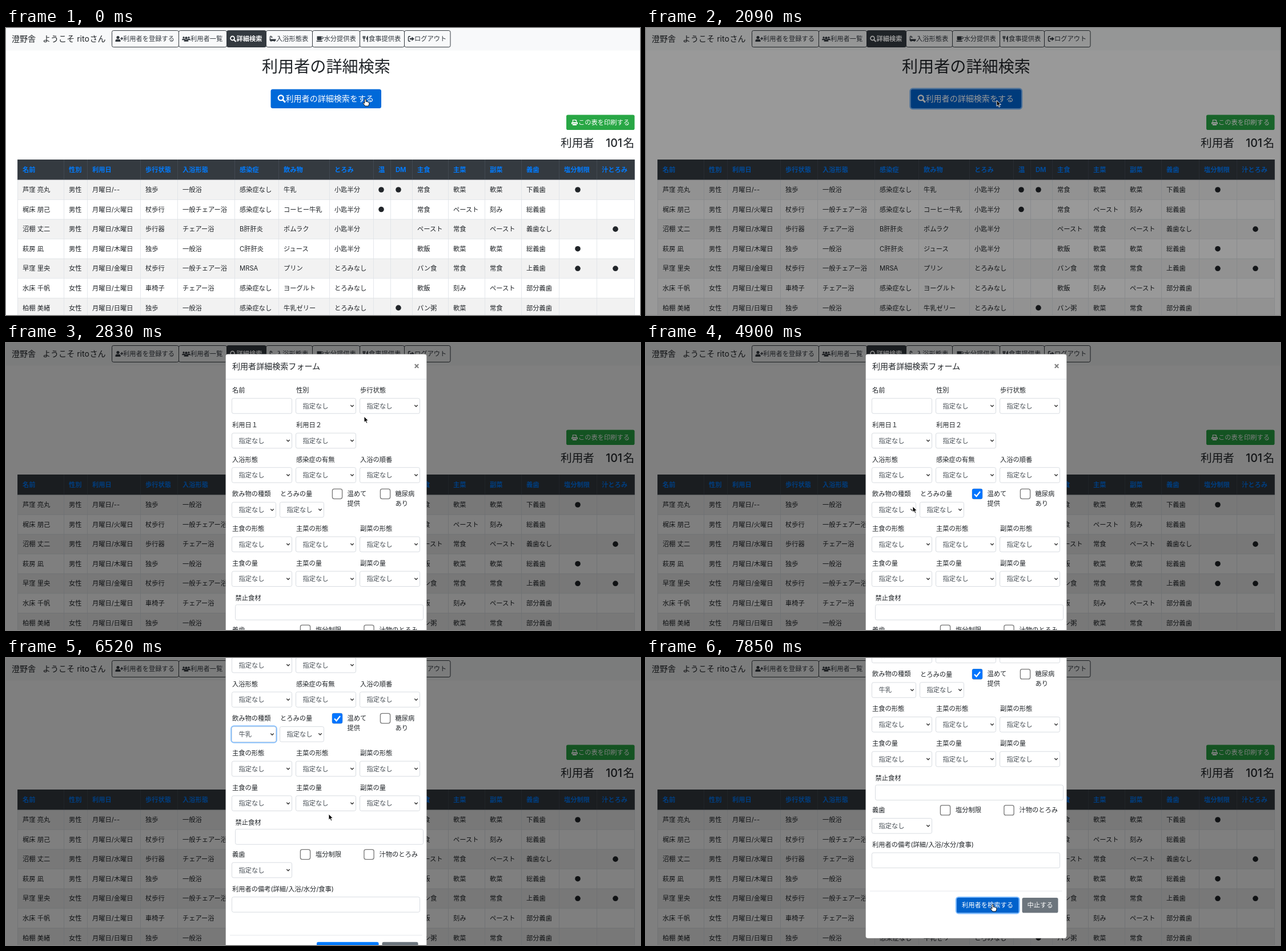
Animation of 1110x504 px, one loop 8000 ms. Source, as an HTML page:

```html
<!DOCTYPE html>
<html lang="ja">
<head>
<meta charset="utf-8">
<style>
html, body { margin: 0; width: 100%; height: 100%; overflow: hidden; background: #fff; }
svg { display: block; font-family: Inter, "Noto Sans CJK JP", "Noto Sans CJK", sans-serif; }
text { white-space: pre; }
</style>
</head>
<body>
<svg id="stage" width="1110" height="504" viewBox="0 0 1110 504"></svg>
<script>
const INK = '#212529', BLUE = '#007bff', DARK = '#343a40', LINE = '#dee2e6';
const EM = 11.25;

// Text is placed by its left edge and the middle of its line
const text = (x, cy, s, { size = EM, fill = INK, weight = 400, id = '' } = {}) =>
  `<text id="${id}" x="${x}" y="${cy + size * .37}" font-size="${size}" font-weight="${weight}" fill="${fill}">${s}</text>`;
const rect = (x, y, w, h, fill, extra = '') =>
  `<rect x="${x}" y="${y}" width="${w}" height="${h}" fill="${fill}" ${extra}/>`;
const path = (d, extra = '') => `<path d="${d}" ${extra}/>`;
const group = (id, s, extra = '') => `<g id="${id}" ${extra}>${s}</g>`;
const white = { fill: '#fff', weight: 500 };
const $ = id => document.getElementById(id);

// Icons are drawn around their own centre
const person = '<circle cy="-2.5" r="2.6"/>' + path('M-4.5 5V3.500Q-4.500 .8-1.800 .8H1.800Q4.500 .8 4.500 3.500V5Z');
const stroke = w => `fill="none" stroke="currentColor" stroke-width="${w}"`;
const icons = {
  add: `<g transform="translate(-2)">${person}</g>` + path('M4.700-3V2M2.200-.5H7.200', stroke(1.4)),
  users: `<g transform="translate(-4.500 -.8) scale(.62)">${person}</g><g transform="translate(4.500 -.8) scale(.62)">${person}</g>` +
    `<g transform="translate(0 .6) scale(.85)">${person}</g>`,
  search: `<circle cx="-1" cy="-1" r="3.500" ${stroke(1.8)}/>` + path('M1.600 1.600L5 5', stroke(2.2)),
  bath: path('M-5.500 .5H5.500V2Q5.500 4 3.500 4V5H2.300V4H-2.300V5H-3.500V4Q-5.500 4-5.500 2Z') +
    path('M-4.600 1V-3.500Q-4.400-5-3-4.600Q-1.800-4.200-1.700-2.500M-3-2.300L-.3-3', stroke(1.2)),
  mug: path('M-5-4.500H3V1Q3 2.500 1.500 2.500H-3.500Q-5 2.500-5 1ZM-6.500 3.500H5L4 5H-5.500Z') +
    path('M3-3.500H4.500Q6-3.300 6-2Q6-.3 4.500-.2H3', stroke(1.2)),
  fork: path('M-4.300-5V-1.500M-2.600-5V5M-.9-5V-1.500M-4.300-1.500Q-2.600 1-.9-1.500', stroke(1.3)) +
    path('M4.300-5.500V5.500H2.800V1.500H1.200Q1.200-4 4.300-5.500Z'),
  exit: path('M-1.500-4.300H-3.500Q-5-4.300-5-2.800V2.800Q-5 4.300-3.500 4.300H-1.500', stroke(1.5)) +
    path('M-2.500-1.300H1V-3.800L5.500 0 1 3.800V1.300H-2.500Z'),
  print: path('M-3.700-5H2.500L3.700-3.800V-1H2.500V-3H1.300V-3.800H-2.500V-1H-3.700ZM-5.500 3V.5Q-5.500-.7-4.300-.7H4.300Q5.500-.7 5.500 .5V3H4V1.500H-4V3ZM-3.500 2.300H3.500V5H-3.500Z')
};
const icon = (name, x, y, color = INK, scale = 1) =>
  `<g transform="translate(${x} ${y}) scale(${scale})" fill="${color}" color="${color}">${icons[name]}</g>`;

// Page
const nav = [
  [185, 302, 'add', 198, 205, '利用者を登録する'], [302, 386, 'users', 315.5, 323, '利用者一覧'],
  [386, 455, 'search', 397.5, 403.5, '詳細検索'], [455, 536, 'bath', 467, 473, '入浴形態表'],
  [536, 619, 'mug', 549.5, 556.5, '水分提供表'], [619, 697, 'fork', 629.5, 635, '食事提供表'],
  [697, 777.5, 'exit', 709.5, 715, 'ログアウト']
].map(([a, b, name, ix, tx, label], i) => {
  const on = i === 2, color = on ? '#fff' : DARK;
  return rect(a + .5, 4.5, b - a, 29, on ? DARK : 'none', `rx="2.800" stroke="${DARK}"`) +
    icon(name, ix, 19, color) + text(tx, 19, label, { fill: color, weight: on ? 700 : 400 });
}).join('');

const edges = [20, 101, 142, 235, 300, 400, 477, 566, 643, 673, 711, 774, 838, 902, 968, 1034, 1100];
const heads = '名前,性別,利用日,歩行状態,入浴形態,感染症,飲み物,とろみ,温,DM,主食,主菜,副菜,義歯,塩分制限,汁とろみ'.split(',');
const rows = [
  '芦窪 亮丸,男性,月曜日/--,独歩,一般浴,感染症なし,牛乳,小匙半分,●,●,常食,軟菜,軟菜,下義歯,●,',
  '梶床 朋己,男性,月曜日/火曜日,杖歩行,一般チェアー浴,感染症なし,コーヒー牛乳,小匙半分,●,,常食,ペースト,刻み,総義歯,,',
  '沼棚 丈二,男性,月曜日/水曜日,歩行器,チェアー浴,B肝肝炎,ポムラク,小匙半分,,,ペースト,常食,ペースト,義歯なし,,●',
  '萩房 凪,男性,月曜日/木曜日,独歩,一般浴,C肝肝炎,ジュース,小匙半分,,,軟飯,軟菜,軟菜,総義歯,●,',
  '早窪 里央,女性,月曜日/金曜日,杖歩行,一般チェアー浴,MRSA,プリン,とろみなし,,,パン食,常食,常食,上義歯,●,●',
  '水床 千帆,女性,月曜日/土曜日,車椅子,チェアー浴,感染症なし,ヨーグルト,とろみなし,,,軟飯,刻み,ペースト,部分義歯,,',
  '柏棚 美緒,女性,月曜日/日曜日,独歩,一般浴,感染症なし,牛乳ゼリー,とろみなし,,●,パン粥,軟菜,常食,部分義歯,,'
];
const TOP = 266.5, PITCH = 34.57;
const cell = (s, col, y) => {
  if (s !== '●') return text(edges[col] + 9, y, s);
  const x = col < 14 ? edges[col] + 14 : (edges[col] + edges[col + 1]) / 2;
  return `<circle cx="${x}" cy="${y}" r="4.800" fill="${INK}"/>`;
};
const table = rows.map((row, i) => {
  const y = TOP + i * PITCH;
  return rect(20, y, 1080, PITCH, i % 2 ? '#fff' : '#f2f2f2') + rect(20, y, 1080, .8, LINE) +
    row.split(',').map((s, col) => cell(s, col, y + 17.5)).join('');
}).join('') + rect(20, 231, 1080.5, 35.5, DARK) +
  edges.map(x => rect(x, TOP, .8, 240, LINE) + rect(x, 231, .8, 35.5, '#454d55')).join('') +
  heads.map((s, i) => text(edges[i] + 9, 248.5, s, { fill: BLUE, weight: 700 })).join('');

const ring = (id, x, y, w, h) =>
  rect(x - 1.1, y - 1.1, w + 2.2, h + 2.2, 'none', `id="${id}" rx="4.500" stroke="${BLUE}" stroke-opacity=".5" stroke-width="2.200"`);

const page = rect(0, 0, 1110, 504, '#fff') + rect(0, 0, 1110, 39.5, '#f8f9fa') +
  text(10, 18.5, '澄野舎', { size: 14.06 }) + text(64, 18.5, 'ようこそ rito', { size: 14.06 }) +
  text(146.5, 18.5, 'さん', { size: 14.06 }) + nav +
  text(448, 68, '利用者の詳細検索', { size: 28.12 }) +
  ring('openRing', 463.5, 107.5, 193.5, 33.5) + rect(463.5, 107.5, 193.5, 33.5, BLUE, 'id="open" rx="3.500"') +
  icon('search', 482.5, 124, '#fff', 1.28) + text(489.5, 124, '利用者の詳細検索をする', { ...white, size: 14.06 }) +
  rect(981, 152.5, 119.5, 26.5, '#28a745', 'rx="2.800"') + icon('print', 995.5, 166, '#fff') +
  text(1002, 166, 'この表を印刷する', white) +
  text(971, 202, '利用者', { size: 19.68 }) + text(1050, 202, '101', { size: 19.68, weight: 500 }) +
  text(1080.5, 202, '名', { size: 19.68 }) + table;

// Search form
const box = (x, cy, w) => rect(x, cy - 13.3, w, 26.6, '#fff', 'rx="2.800" stroke="#ced4da" stroke-width=".8"');
const select = (x, cy, w = 105, id = '') => box(x, cy, w) +
  text(x + 12, cy, '指定なし', { fill: '#495057', id }) +
  path(`M${x + w - 9.2} ${cy - 1.5}l2.700 2.800 2.700-2.800`, 'fill="none" stroke="#333" stroke-width="1.400"');
const check = (cx, cy) => rect(cx - 8.6, cy - 8.6, 17.2, 17.2, '#fff', 'rx="3" stroke="#767676" stroke-width="1.300"');
const cols = [395.5, 507.5, 619.5];
const field = (label, x, y, w) => text(x + .5, y, label) + select(x, y + 27.5, w);
const trio = (labels, y) => labels.split(',').map((s, i) => field(s, cols[i], y)).join('');

const form = rect(384.5, 19.5, 352, 709.5, '#fff', 'rx="4" stroke="#000" stroke-opacity=".2" stroke-width=".8"') +
  text(396, 41, '利用者詳細検索フォーム', { size: 14.06 }) +
  path('M715.800 37.300l6.400 6.400M722.200 37.300l-6.400 6.400', 'stroke="#7f7f7f" stroke-width="2"') +
  rect(385, 63, 351, .8, LINE) +
  text(396, 83, '名前') + box(395.5, 110.5, 105) +
  field('性別', cols[1], 83) + field('歩行状態', cols[2], 83) +
  trio('利用日１,利用日２', 144) + trio('入浴形態,感染症の有無,入浴の順番', 204.5) +
  text(396, 265, '飲み物の種類') + ring('drinkRing', 395.5, 279.7, 77, 26.6) + select(395.5, 293, 77, 'drink') +
  field('とろみの量', 479.5, 265.3, 77) +
  check(580, 265) + text(597.5, 265, '温めて') + text(597.5, 282, '提供') +
  group('ticked', rect(571, 256, 18, 18, '#0075ff', 'rx="3"') +
    path('M575 265.500l3.500 3.700 6.500-8.200', 'fill="none" stroke="#fff" stroke-width="2.300"')) +
  check(664, 265) + text(681.5, 265, '糖尿病') + text(681.5, 282, 'あり') +
  trio('主食の形態,主菜の形態,副菜の形態', 326) + trio('主食の量,主菜の量,副菜の量', 386.7) +
  text(401.5, 447.5, '禁止食材') + box(401.5, 473, 329) +
  field('義歯', 395.5, 504) + check(524, 504) + text(542, 504, '塩分制限') +
  check(635.5, 504) + text(653.5, 504, '汁物のとろみ') +
  text(396, 565, '利用者の備考(詳細/入浴/水分/食事)') + box(395.5, 592, 329) +
  rect(392, 645.5, 336.5, .8, LINE) +
  ring('goRing', 544, 657.8, 108.5, 26.4) + rect(544, 657.8, 108.5, 26.4, BLUE, 'id="go" rx="2.800"') +
  text(553, 671, '利用者を検索する', white) +
  rect(658.5, 657.8, 63, 26.4, '#6c757d', 'rx="2.800"') + text(667.5, 671, '中止する', white);

const drinks = '指定なし,牛乳,コーヒー牛乳,ポムラク,ジュース,プリン,ヨーグルト,牛乳ゼリー'.split(',');
const menu = rect(387.5, 281, 103, 151, '#f3f3f3', 'rx="4" stroke="#bbb" stroke-width=".8"') +
  rect(391, 302.5, 96, 18, BLUE, 'id="hot" rx="3"') +
  drinks.map((s, i) => text(407, 293.5 + i * 18, s)).join('') +
  path('M395.500 293.500l2.500 3 4.500-6.500', 'fill="none" stroke="#212529" stroke-width="1.300"');

const arrow = path('M0 0V10.300L2.300 8.200 4 12 5.800 11.200 4.100 7.500H7.300Z', 'fill="#000" stroke="#fff" stroke-width=".9"');
const hand = path('M-1.200 1Q0-.7 1.200 1V5Q2.500 4 3.300 5.300Q4.600 4.700 5.300 6Q6.800 5.700 6.800 7.200V9L5.500 12.500H-.3L-3.600 8Q-3.800 6.300-2.400 6.700L-1.200 7.800Z',
  'fill="#fff" stroke="#000" stroke-width=".9"');

$('stage').innerHTML = page + rect(0, 0, 1110, 504, '#000', 'id="shade"') + group('modal', form) +
  group('menu', menu) + group('cursor', group('arrow', arrow) + group('hand', hand));

const LOOP = 8000, START = 1342, STEP = 147.73;
const pointer = [
  [-1, 629, 124.5], [0, 622, 126], [1, 614, 127], [7, 614, 127], [8, 617, 127], [9, 617, 127],
  [10, 627, 129], [12, 624, 206], [13, 624, 206], [16, 574, 264.5], [20, 574, 264.5], [24, 467, 287],
  [25, 467, 287], [27, 440, 309], [28, 440, 309], [31, 565, 274], [40, 565, 274], [43, 607, 432.5]
];
const scroll = [[31, 0], [32, 20], [34, 125], [35, 159], [36, 165], [38, 212], [40, 236.7]];
const slide = [[6, -15], [7, -2], [8, 0]];

function at(keys, n, col = 1) {
  const i = keys.findIndex(k => k[0] >= n);
  if (i < 0) return keys[keys.length - 1][col];
  if (i === 0) return keys[0][col];
  const a = keys[i - 1], b = keys[i];
  return a[col] + (b[col] - a[col]) * (n - a[0]) / (b[0] - a[0]);
}
const show = (id, on) => $(id).setAttribute('visibility', on ? 'visible' : 'hidden');
const set = (id, name, value) => $(id).setAttribute(name, value);

function draw(now) {
  const n = Math.max(-1, Math.floor((now % LOOP - START) / STEP));
  const overButton = n < 4 || n >= 43;
  set('shade', 'opacity', n < 5 ? 0 : n === 5 ? .4 : .5);
  set('modal', 'opacity', n < 6 ? 0 : n === 6 ? .45 : 1);
  set('modal', 'transform', `translate(0 ${at(slide, n) - at(scroll, n)})`);
  set('open', 'fill', n < 4 ? '#0069d9' : '#0062cc');
  show('openRing', n >= 4);
  show('ticked', n >= 19);
  show('menu', n >= 25 && n < 28);
  show('hot', n >= 26 && n < 28);
  show('drinkRing', n >= 25 && n < 44);
  $('drink').textContent = drinks[n < 28 ? 0 : 1];
  set('go', 'fill', n < 43 ? BLUE : n < 44 ? '#0069d9' : '#0062cc');
  show('goRing', n >= 44);
  set('cursor', 'transform', `translate(${at(pointer, n)} ${at(pointer, n, 2)})`);
  show('hand', overButton);
  show('arrow', !overButton);
  requestAnimationFrame(draw);
}
draw(performance.now());
</script>
</body>
</html>
```
